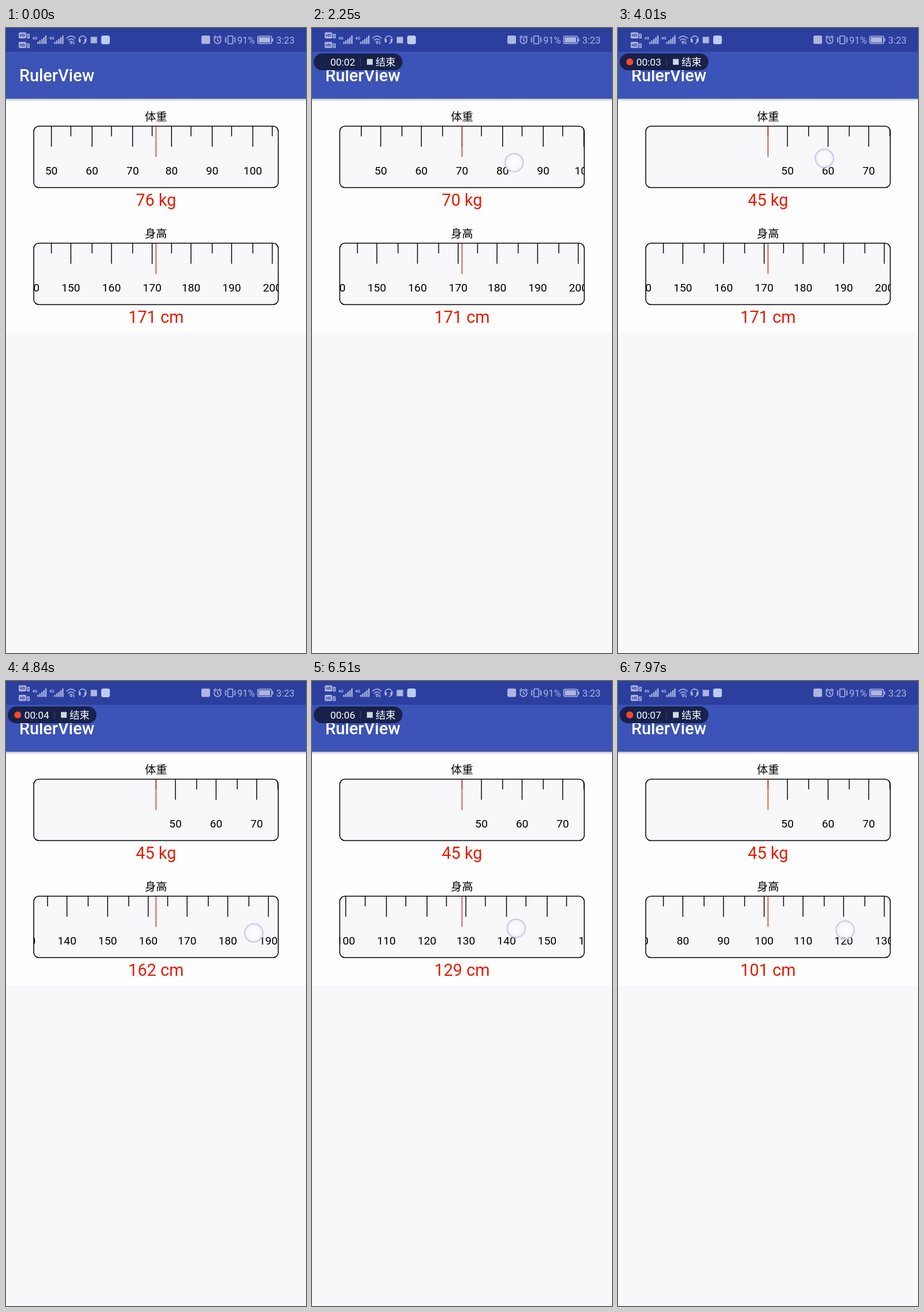
These frames come from a looping animation (519x1079 px, 8 s). An HTML page:

```html
<!DOCTYPE html>
<html lang="zh">
<head>
<meta charset="utf-8">
<title>RulerView</title>
<style>
html, body { margin: 0; width: 100%; height: 100%; overflow: hidden; background: #f8f8fb; }
svg { display: block; width: 519px; height: 1079px; font-family: Roboto, "Noto Sans CJK SC", "Noto Sans CJK", sans-serif; }
.mid { text-anchor: middle; }
.label, .num { font-size: 19.2px; fill: #000; }
.value { font-size: 28.8px; fill: #e51c00; }
.tick { stroke: #000; stroke-width: 1.45; }
.status { fill: #adb5e0; font-size: 16.4px; }
.thin { fill: none; stroke: #adb5e0; stroke-width: 1.6; }
.tiny { font-size: 7px; font-weight: 700; }
</style>
</head>
<body>
<svg id="stage" viewBox="0 0 519 1079" xmlns="http://www.w3.org/2000/svg">
  <defs>
    <linearGradient id="shade" x2="0" y2="1">
      <stop offset="0" stop-color="#555a78" stop-opacity=".55"/>
      <stop offset=".4" stop-color="#555a78" stop-opacity=".2"/>
      <stop offset="1" stop-color="#555a78" stop-opacity="0"/>
    </linearGradient>
    <radialGradient id="glow">
      <stop offset="0" stop-color="#fefdff" stop-opacity=".95"/>
      <stop offset=".65" stop-color="#fdfcff" stop-opacity=".85"/>
      <stop offset="1" stop-color="#f3f1fb" stop-opacity=".55"/>
    </radialGradient>
    <clipPath id="box"><rect x="47.5" y="169.3" width="424" height="106.5" rx="9"/></clipPath>
  </defs>

  <rect width="519" height="1079" fill="#f8f8fb"/>
  <rect y="122" width="519" height="404" fill="#fefeff"/>
  <rect y="41" width="519" height="81" fill="#3c53b7"/>
  <rect y="121.5" width="519" height="6" fill="url(#shade)"/>
  <rect width="519" height="41" fill="#2c3f9f"/>
  <text x="23" y="92" font-size="28.8" font-weight="500" fill="#fff">RulerView</text>

  <g class="status">
    <g id="sim">
      <rect x="22" y="7.5" width="13" height="10.5" rx="2"/>
      <text class="tiny mid" x="28.5" y="15.4" fill="#2c3f9f">HD</text>
      <rect x="36" y="10" width="5" height="8" rx="1"/>
      <path d="M37.3 12h2v2h-2v2h2" fill="none" stroke="#2c3f9f" stroke-width=".8"/>
    </g>
    <use href="#sim" y="16.5"/>
    <g id="signal">
      <text class="tiny" x="45.5" y="19.5">4G</text>
      <path d="M54 24h2.4v3.5H54zM57.5 21.5h2.4v6h-2.4zM61 19h2.4v8.5H61zM64.4 16h2.4v11.5h-2.4zM67.8 13h2.4v14.5h-2.4z"/>
    </g>
    <use href="#signal" x="29.3"/>
    <path class="thin" d="M104.5 18q8-8 16 0M107.2 21.3q5.3-5 10.6 0M110 24.3q2.5-2.4 5 0"/>
    <circle cx="112.5" cy="26.3" r="1.5"/>
    <path d="M117 23l2 2.2h-4zM117 28.500l2-2.200h-4z"/>
    <path class="thin" d="M127.500 24a6.300 6.300 0 1 1 10 0q-1.500 2.500-4.500 3"/>
    <rect x="126" y="19" width="3.3" height="6" rx="1.3"/>
    <rect x="135.700" y="19" width="3.3" height="6" rx="1.3"/>
    <rect x="146.500" y="15.300" width="11" height="11"/>
    <rect x="164.700" y="13" width="15" height="15" rx="3.500" fill="#bccdf3"/>
    <rect x="338" y="13" width="15" height="14.500" rx="2.500"/>
    <circle class="thin" cx="366" cy="21" r="5.800"/>
    <path class="thin" d="M366 17.500v4l2.500 1.500M359 16.500l4-3.500M373 16.500l-4-3.500"/>
    <rect class="thin" x="383.800" y="13.700" width="8.500" height="13.500" rx="1"/>
    <path class="thin" stroke-width="1.300" d="M379.300 16l1.500 2-1.500 2.500 1.500 2.500-1.500 2M396.800 16l-1.500 2 1.500 2.500-1.500 2.500 1.500 2"/>
    <text x="400" y="26.500">91%</text>
    <rect class="thin" x="435.500" y="14.200" width="24" height="12.600" rx="2.500" stroke-width="1.200"/>
    <rect x="437.300" y="16" width="19.500" height="9" rx="1"/>
    <rect x="460.500" y="17.800" width="1.800" height="5.500" rx=".6"/>
    <text x="467.500" y="26.500">3:23</text>
  </g>

  <g id="rulers"></g>

  <g id="touch">
    <circle r="17" fill="#8b84bc" opacity=".12"/>
    <circle r="15.700" fill="url(#glow)" stroke="#cdc8e6" stroke-width="2"/>
  </g>

  <g id="pill">
    <rect x="3" y="44" width="153.500" height="29" rx="14.500" fill="#162046" fill-opacity=".96"/>
    <circle id="dot" cx="20.300" cy="58.500" r="6" fill="#fa482a"/>
    <text id="clock" x="31.700" y="65" font-size="17.300" fill="#fff">00:00</text>
    <path d="M84 52v14" stroke="#454e72"/>
    <rect x="95" y="53.500" width="10" height="10" fill="#d4d6df"/>
    <text x="110" y="65.300" font-size="17.300" fill="#fff">结束</text>
  </g>
</svg>
<script>
const LOOP = 8000, UNIT = 6.728, GAP = 3, MID = 259.5, CLOCK_START = 200;
const $ = id => document.getElementById(id);

function add(parent, tag, attrs, text = "") {
  const el = document.createElementNS("http://www.w3.org/2000/svg", tag);
  for (const k in attrs) el.setAttribute(k, attrs[k]);
  el.textContent = text;
  parent.append(el);
  return el;
}

// Every tenth unit away from the pointer takes a little more room.
const offset = d => Math.sign(d) * (UNIT * Math.abs(d) + GAP * Math.floor(Math.abs(d) / 10));

function makeRuler(name, unit, top, min, max) {
  const g = add($("rulers"), "g", { transform: `translate(0 ${top})` });
  add(g, "text", { class: "label mid", x: MID, y: 160.2 }, name);
  const frame = { x: 48, y: 169.5, width: 423, height: 106, rx: 9 };
  add(g, "rect", { ...frame, fill: "#f8f7fa" });
  const scale = add(g, "g", { "clip-path": "url(#box)" });
  const ticks = [];
  for (let v = min; v <= max; v += 5) {
    const el = add(scale, "g", {}), long = v % 10 === 0;
    add(el, "line", { class: "tick", y1: 169.5, y2: long ? 205 : 187 });
    if (long) add(el, "text", { class: "num mid", y: 253 }, v);
    ticks.push({ v, el });
  }
  add(g, "rect", { ...frame, fill: "none", stroke: "#000", "stroke-width": 1.5 });
  add(g, "line", { x1: MID, x2: MID, y1: 170, y2: 222.5, stroke: "#d9301c", "stroke-width": 1.45 });
  const out = add(g, "text", { class: "value mid", x: MID, y: 306.5 });
  let shown;
  return value => {
    if (value === shown) return;
    shown = value;
    out.textContent = `${value} ${unit}`;
    for (const { v, el } of ticks) el.setAttribute("transform", `translate(${MID + offset(v - value)} 0)`);
  };
}

const rulers = [makeRuler("体重", "kg", 0, 45, 120), makeRuler("身高", "cm", 202, 60, 220)];
const START = [76, 171];

// Each drag: ruler, then steps of time, finger x, finger y, value.
const DRAGS = [
  [0, [[710, 317, 236, 76], [920, 317, 236, 76], [1500, 324, 235, 74], [2350, 353, 232, 69.6]]],
  [0, [[2590, 300, 242, 69.6], [3010, 318, 239, 67], [3420, 430, 229, 51.2]]],
  [0, [[3560, 312, 231, 51.2], [4010, 357, 225, 45], [4170, 372, 224, 45]]],
  [1, [[4260, 366, 440, 171], [4400, 373, 439, 170], [5160, 469, 432, 156.6]]],
  [1, [[5320, 315, 436, 156.6], [5510, 326, 434, 155], [6010, 469, 428, 134]]],
  [1, [[6180, 317, 430, 134], [6510, 353, 427, 129], [7030, 453, 424, 114.4]]],
  [1, [[7210, 302, 434, 114.4], [7970, 393, 430, 101], [8000, 395, 430, 101]]]
];

function along(steps, t) {
  const i = steps.findIndex(s => s[0] > t);
  if (i < 0) return steps[steps.length - 1];
  const a = steps[i - 1], b = steps[i], k = (t - a[0]) / (b[0] - a[0]);
  return a.map((n, j) => n + (b[j] - n) * k);
}

function draw(t) {
  const values = [...START];
  let finger = null;
  for (const [r, steps] of DRAGS) {
    if (t < steps[0][0]) break;
    const [, x, y, v] = along(steps, t);
    values[r] = v;
    finger = t < steps[steps.length - 1][0] ? [x, y] : null;
  }
  rulers.forEach((show, i) => show(Math.round(values[i])));
  $("touch").style.display = finger ? "" : "none";
  if (finger) $("touch").setAttribute("transform", `translate(${finger})`);

  const run = Math.max(0, t - CLOCK_START);
  $("pill").setAttribute("opacity", Math.min(1, Math.max(0, (t - 100) / 230)));
  $("dot").style.display = run % 1000 >= 500 ? "" : "none";
  $("clock").textContent = "00:0" + Math.floor(run / 1000);
}

const t0 = performance.now();
function tick() {
  draw((performance.now() - t0) % LOOP);
  requestAnimationFrame(tick);
}
tick();
</script>
</body>
</html>
```
